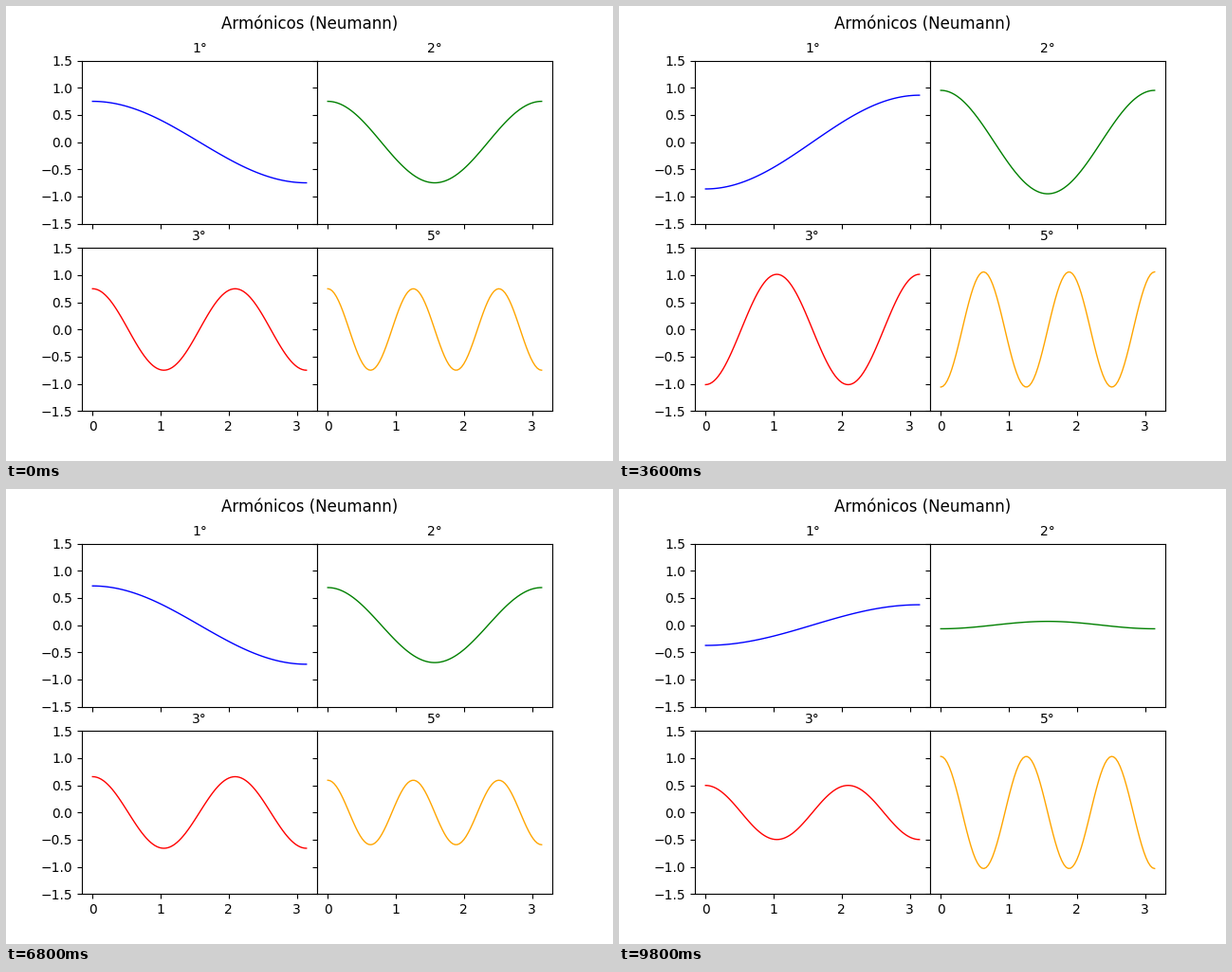
A matplotlib script for the animation above (10 s loop, 640 by 480 pixels).

```python
import numpy as np
import matplotlib.pyplot as plt
from matplotlib.animation import FuncAnimation

FRAMES = 50
INTERVAL = 200
AMP = 0.75
MODES = [(1, "blue"), (2, "green"), (3, "red"), (5, "orange")]

x = np.linspace(0, np.pi, 100)
times = np.linspace(0, 9, FRAMES)


def harmonic(n, t):
    """Standing wave of mode n with zero slope at both ends."""
    return AMP * (np.cos(n * t) + np.sin(n * t)) * np.cos(n * x)


plt.rcParams["font.family"] = "DejaVu Sans"
fig, axes = plt.subplots(2, 2, sharex=True, sharey=True,
                         figsize=(6.4, 4.8), dpi=100,
                         gridspec_kw={"hspace": 0.15, "wspace": 0})
fig.suptitle("Armónicos (Neumann)", fontsize=12)

lines = []
for ax, (n, color) in zip(axes.flat, MODES):
    line, = ax.plot(x, harmonic(n, 0), color=color, lw=1)
    ax.set_title(f"{n}°", fontsize=10)
    ax.set_ylim(-1.5, 1.5)
    lines.append(line)


def update(i):
    for line, (n, _) in zip(lines, MODES):
        line.set_ydata(harmonic(n, times[i]))
    return lines


anim = FuncAnimation(fig, update, frames=FRAMES, interval=INTERVAL,
                     init_func=lambda: update(0), repeat=True)
plt.show()
```
